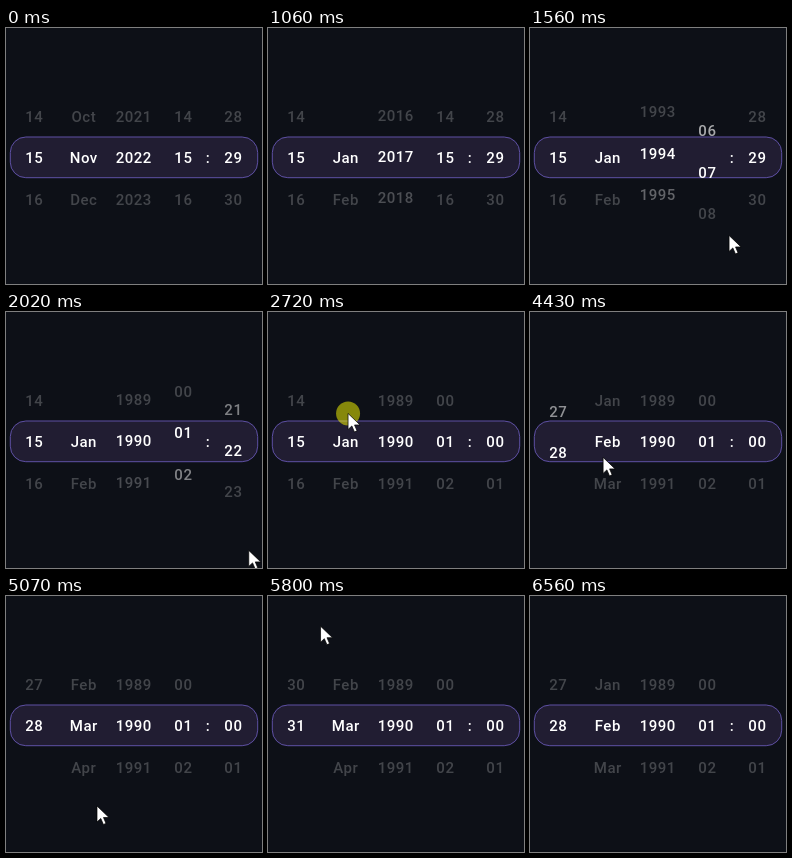
Animation, 256 px wide and 256 px high, one loop 7080 ms. Source, as an HTML page:

```html
<!DOCTYPE html>
<html lang="en">
<head>
<meta charset="utf-8">
<title>Date and time wheel picker</title>
<style>
  html, body { margin: 0; width: 100%; height: 100%; overflow: hidden; background: #0d1017; }
  svg { display: block; width: 100%; height: 100%; }
  text {
    font: 500 15px Roboto, "Noto Sans", sans-serif;
    letter-spacing: .5px;
    text-anchor: middle;
    fill: #fff;
  }
</style>
</head>
<body>
<svg viewBox="0 0 256 256">
  <clipPath id="view"><rect y="68" width="256" height="124"/></clipPath>
  <rect width="256" height="256" fill="#0d1017"/>
  <rect x="4.3" y="109" width="247.4" height="40.7" rx="15.5" fill="#211d32" stroke="#5e50a4"/>
  <g id="wheels" clip-path="url(#view)"></g>
  <text x="202" y="135">:</text>
  <g id="pointer">
    <circle id="press" r="12" fill="#ff0" fill-opacity=".5"/>
    <path d="M0 0V16L3.8 12.5L6.4 18.5L9 17.4L6.5 11.5H12Z" fill="#fff" stroke="#000" stroke-width=".7"/>
  </g>
</svg>
<script>
const LOOP = 7080, ROW = 41.3, BASELINE = 135.2;
const MONTHS = 'Jan Feb Mar Apr May Jun Jul Aug Sep Oct Nov Dec'.split(' ');
const $ = id => document.getElementById(id);
const two = n => String(n).padStart(2, '0');
const clamp = (v, lo, hi) => Math.min(hi, Math.max(lo, v));
const mix = (a, b, u) => a + (b - a) * u;
const part = (t, a, b) => clamp((t - a) / (b - a), 0, 1);
const smooth = u => u * u * (3 - 2 * u);

const wheel = (x, row, min, max, label) => ({ x, row, min, max, label, drags: [] });
const month = wheel(77.8, 10, 0, () => 11, i => MONTHS[i]);
const year = wheel(127.8, 2022, 1900, () => 2100, String);
const day = wheel(28.2, 15, 1, lastDay, two);
const hour = wheel(177.4, 15, 0, () => 23, two);
const minute = wheel(227.4, 29, 0, () => 59, two);
const wheels = [day, month, year, hour, minute];

const stops = [];
const hover = (t, x, y, down = false) => stops.push({ t, x, y, down });

// Drag a wheel from y0 to y1, then let it coast to the row `to`.
function drag(w, t0, t1, y0, y1, dx, to, rest, pow = 2) {
  w.drags.push({ t0, t1, rows: (y0 - y1) / ROW, to, rest, pow });
  hover(t0, w.x, y0, true);
  hover(t1, w.x + dx, y1);
}

hover(270, 100, 264);
drag(month, 420, 560, 92, 264, 6, 0, 960, 3);
drag(year, 890, 1080, 90, 318, 10, 1990, 2120, 3);
drag(hour, 1260, 1420, 92, 264, 8, 1, 2255, 3);
drag(minute, 1790, 1952, 90, 243, 20, 0, 2450, 1);
drag(month, 2650, 2870, 75, 157, 7, 0, 2880);
drag(month, 3170, 3310, 157, 122, 4, 1, 3480);
drag(day, 3690, 3765, 38, -13, 17, 28, 4550);
drag(month, 4640, 4780, 172, 130, 3, 2, 4980);
hover(5070, 91, 210);
drag(day, 5490, 5640, 178, 0, 12, 31, 5660);
drag(month, 6060, 6180, 92, 130, 6, 1, 6340);
hover(6420, 131, 264);

// The day list follows the chosen month with a short delay.
function lastDay(t) {
  return new Date(Math.round(rowAt(year, t)), Math.round(rowAt(month, t - 380)) + 1, 0).getDate();
}

function rowAt(w, t) {
  const max = w.max(t);
  let row = w.row;
  for (const d of w.drags) {
    if (t < d.t0) break;
    row = clamp(row + d.rows * part(t, d.t0, d.t1), w.min, max);
    row = mix(row, d.to, 1 - (1 - part(t, d.t1, d.rest)) ** d.pow);
  }
  return clamp(row, w.min, max);
}

for (const w of wheels) {
  w.rows = [-1, 0, 1].map(() => {
    const el = document.createElementNS('http://www.w3.org/2000/svg', 'text');
    el.setAttribute('x', w.x);
    return $('wheels').appendChild(el);
  });
}

function drawWheel(w, t) {
  const row = rowAt(w, t), max = w.max(t);
  w.rows.forEach((el, k) => {
    const i = Math.round(row) + k - 1, dy = (i - row) * ROW;
    el.textContent = i < w.min || i > max ? '' : w.label(i);
    el.setAttribute('y', BASELINE + dy);
    el.setAttribute('opacity', mix(1, .22, part(Math.abs(dy), 14, ROW)));
  });
}

function drawPointer(t) {
  const n = stops.findIndex(s => s.t > t);
  const b = stops.at(n), a = n > 0 ? stops[n - 1] : b;
  const raw = a === b ? 0 : part(t, a.t, b.t);
  const u = a.down ? raw : smooth(raw);
  $('pointer').setAttribute('transform', `translate(${mix(a.x, b.x, u)} ${mix(a.y, b.y, u)})`);
  $('press').style.display = a.down ? '' : 'none';
}

const start = performance.now();
function frame() {
  const t = (performance.now() - start) % LOOP;
  wheels.forEach(w => drawWheel(w, t));
  drawPointer(t);
  requestAnimationFrame(frame);
}
frame();
</script>
</body>
</html>
```
